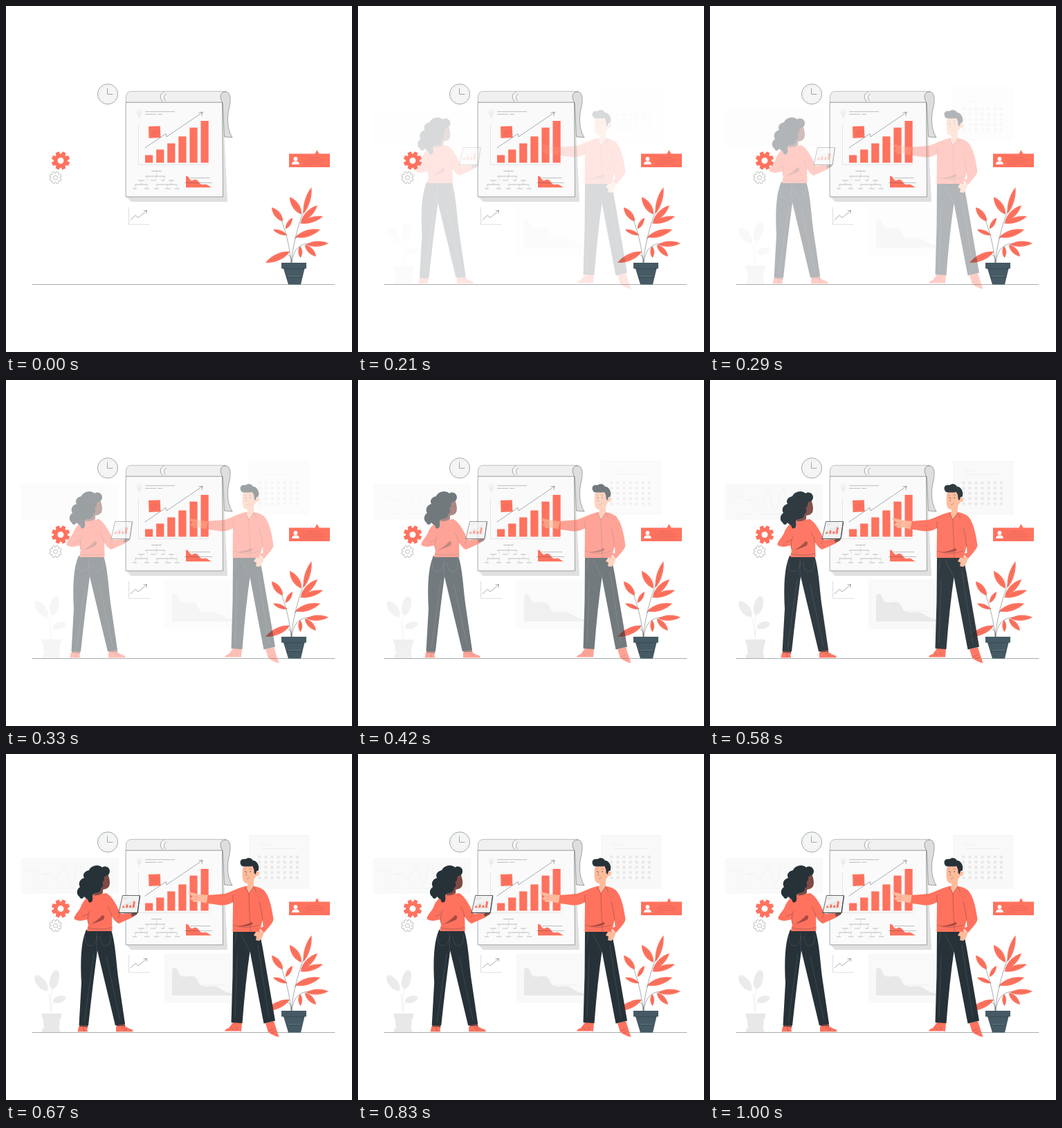
These frames come from a looping animation (500 px wide and 500 px high, 1.04 s). An HTML page:

```html
<!DOCTYPE html>
<html lang="en">
<head>
<meta charset="utf-8">
<title>Business presentation</title>
<style>
html, body { margin: 0; width: 100%; height: 100%; overflow: hidden; background: #fff; }
svg { display: block; width: 100vw; height: 100vh; }
.coral { fill: #ff725e; }
.dark { fill: #263238; }
.skin { fill: #ffbb9c; }
.brown { fill: #7f4a43; }
.fold { fill: #a94a40; }
.pale { fill: #e8e8e8; }
.line { fill: none; stroke: #263238; stroke-width: .5; stroke-opacity: .8; stroke-linecap: round; stroke-linejoin: round; }
.thin { fill: none; stroke: #263238; stroke-width: .4; stroke-opacity: .75; }
.hair { fill: none; stroke: #263238; stroke-width: .25; stroke-opacity: .5; }
.seam { fill: none; stroke: #6f7b80; stroke-width: .3; }
.faint { fill: none; stroke: #e8e8e8; stroke-width: .6; }
</style>
</head>
<body>
<svg viewBox="0 0 500 500">
  <g id="backdrop">
    <path fill="#f9f9f9" d="M22 150H163V202H22ZM229 288H327V360H229Z"/>
    <path class="faint" stroke-opacity=".7" d="M31 168h16l3 6h12M57 179q5-15 11-3t11-7 10 8 11-5 10 5 13 1M45 194h16M71 194h30M108 194h12"/>
    <path fill="#f9f9f9" stroke="#f0f0f0" stroke-width=".6" d="M351.5 117.500H438V194H351.500Z"/>
    <path class="faint" d="M366 131h17M369 136.500h49"/>
    <g id="days" class="pale"></g>
    <path class="pale" d="M240 349V312C243 306 248 310 250 317C253 324 260 321 266 321C275 320 276 326 280 333C286 339 298 333 306 337C314 341 318 345 327 346V349Z"/>
    <path class="faint" d="M283 334h31"/>
    <g fill="#ebebeb">
      <ellipse cx="70" cy="326" rx="6.500" ry="14" transform="rotate(14 70 326)"/>
      <ellipse cx="51" cy="331" rx="6.500" ry="13.500" transform="rotate(-38 51 331)"/>
      <ellipse cx="77" cy="354.500" rx="9.500" ry="5" transform="rotate(-18 77 354.500)"/>
    </g>
    <path class="faint" d="M65 375Q66 355 58 339M65 371Q62 356 69 328M65 371Q64 360 74 355"/>
    <path class="pale" d="M51.500 375H80V380.500H78.500L76.500 397H78V402H52V397H55L53 380.500H51.500Z"/>
    <path class="faint" stroke="#d8d8d8" d="M53 381H79M54 397H77"/>
  </g>

  <path class="line" stroke-opacity=".65" d="M38 402.500H475"/>

  <g id="clock">
    <circle cx="147" cy="127.300" r="14.600" fill="#f5f5f5" stroke="#455a64" stroke-width=".5"/>
    <path class="line" d="M146.500 119V127.500H154"/>
    <path id="ticks" class="hair"/>
  </g>

  <g id="board">
    <path fill="#e0e0e0" d="M174 276L181 283H320L313 139Z"/>
    <path class="line" style="fill:#f0f0f0;stroke-width:.35" d="M173.500 139V131Q174 123.300 182 123.300H318L313 139Z"/>
    <path class="line" style="fill:#fafafa" d="M228 124Q219 129 226 138M231.500 127Q226 132 230.500 137"/>
    <path class="line" style="fill:#dedede" d="M313 140C307 130 311 124 317 124C325 124 325 135 323 145C319 160 319 177 327 190L316 189Z"/>
    <path class="line" style="fill:#fafafa" d="M173.500 139.300H312.500L313.500 275.800H173.500Z"/>
    <path class="hair" d="M190 153q-1 4 1.500 5.500h2q2.500-2 1.500-5.500M190.500 161h3.500M192.500 150v8M187 150l2 2M197 150l-2 2"/>
    <path class="thin" d="M201 152.700h43M201 156.500h16M219 156.500h7"/>
    <path class="line" style="stroke:#c4c4c4" d="M191.500 172V229.500H293"/>
    <g id="bars" class="coral"></g>
    <path class="coral" d="M206 174L222.700 173.500L223.500 190.300L206.500 191Z"/>
    <path class="hair" d="M209 180h11M209 183h12M210 186h7"/>
    <path class="line" d="M201 205L231 184.500L232 189L284 153.700M279 154L284 153.500L283 158.500"/>
    <path class="thin" d="M210 238.500h15M201 246h29M191 252h9M209 252h7M224 252h5M235 252h8M186 258h19M217 258h30M183 264h6M200 264h7M214 264h7M230 264h8M244 264h7"/>
    <path class="hair" d="M217.500 238.500v7.500M204 246v6M217 246v6M229 246v6M195 252v6M239 252v6M187 258v5M204 258v5M218 258v5M233 258v5M247 258v5"/>
    <path class="coral" d="M260 246C264 244 265 252 269 252.500C273 250 276 250 279 255C283 260 286 257 290 258L297 262.300H260Z"/>
    <path class="thin" d="M266 248.500h29M258 255.500h40"/>
    <path class="line" style="stroke:#aaa" d="M177.500 291V315.700H207"/>
    <path class="line" d="M180 309L187 302.500L191 306L203 296M199 296L203.500 295.500L203 300"/>
  </g>

  <path id="bigGear" class="coral" fill-rule="evenodd"/>
  <path id="smallGear" class="thin" style="fill:#fff" fill-rule="evenodd"/>

  <g id="card">
    <path class="coral" d="M409 213.500H446.500L449.500 208L452.500 213.500H468V233H409Z"/>
    <circle cx="418.500" cy="221" r="2.900" fill="#fff"/>
    <path fill="#fff" d="M413 229Q413.500 224.500 417 224.500H420Q423.500 224.500 424 229Z"/>
    <path class="hair" d="M435 219.500h18M430 223h29M433 226h25M429 229h15"/>
  </g>

  <g id="plant">
    <path class="line" d="M412 371C414 350 421 320 429 299L437 276M412 371C410 350 406 330 397 307M413 371C415 352 424 343 440 343M413 371Q414 359 403 358M417 336L425 332M406 331L399 327"/>
    <g id="coralLeaves"></g>
    <path fill="#455a64" d="M398 371H434V379.500H431.500L426 402.500H408L401 379.500H398Z"/>
    <path class="line" d="M401 379.700H431.500M406 393l3-2 3 2 3-2 3 2 3-2 3 2 3-2"/>
    <path class="thin" style="stroke:#a5b0b5" d="M407 390.500h19"/>
  </g>

  <g id="man">
    <path class="coral" d="M328 388L341 388L340 400.500H316Q317 397 322 396ZM375 389L387 386L394.500 409Q388 408 379 402Z"/>
    <path class="thin" d="M325 395l4 3M332 394l3 4M380 400l7-3M383 403l6-2"/>
    <path class="dark" d="M328 256H366L370.500 278L389 385.500L372.500 389.500L352.500 285Q346 330 341.500 389L325.500 388L327.500 320Z"/>
    <path class="seam" d="M340 260L352 285M333 258l-2 16M364 276l16 105M334 290l-3 90"/>
    <path class="skin" d="M363 254L373 257Q371 266 366 270L361 269L362 264L358 262Z"/>
    <path class="skin" d="M292 204L280 203L266 199.500Q261 199.500 265 202.500L270 206L266 209Q267 211 269 211L271 214L279 213L291 216Z"/>
    <path class="hair" d="M271 206l6 1M269 211l7-1"/>
    <path class="coral" d="M346 191C334 194 326 199 316 202L292 204L289.500 215.500L310 218.500Q320 219 328 214L327.500 257H366L371 240L371.500 250L365 251L373 258C379 251 386 244 386.500 239C384 222 381 206 373 197Q366 192 358 191Z"/>
    <path class="thin" d="M346 193l5 9 7-10 4 8M351 202l2 55M366 213q4 16 5 28M328 204v11M328 247q20 7 38 0"/>
    <path class="fold" d="M333 249Q345 248 355 243Q359 246 352 248Q343 250 333 249Z"/>
    <path class="skin" d="M343 161C341 169 341 178 343 184Q346 188 349 187L348 194L351 201L358 191V182L363 174V160Z"/>
    <circle class="skin" cx="362.500" cy="173" r="3.300"/>
    <path class="dark" d="M341 162C336 157 339 150 346 152C350 149 355 150 357 154C363 154 367 162 364.500 169Q361 168 361 174L358.500 172Q359 166 356 162Q349 163 341 162Z"/>
    <path class="thin" d="M344 166.500l3-.5M351 166l4 .5M348 170l-1.500 5h2M348 180.500q3-.5 4-2.500"/>
    <circle class="dark" cx="346" cy="170" r=".7"/>
    <circle class="dark" cx="353" cy="170" r=".7"/>
  </g>

  <g id="woman">
    <path class="brown" d="M106 389H118V396H106ZM159 388L171 387L173 396H161Z"/>
    <path class="coral" d="M105 394L117 394.500L118 401.300H103.500ZM159 393.500L172 393Q175 396 182 398Q184 400 183.500 401.300H159Z"/>
    <path class="thin" d="M112 395l1 6M167 396l5-1M170 399l5-2"/>
    <path class="dark" d="M116 254H152C158 273 159 298 162 322L172 390L158 392.500L132 284Q125 336 119 392.500L105.500 392L109 330C107.500 300 108 272 116 254Z"/>
    <path class="seam" d="M131 258L131 284M114 262q0 16 8 15t10-14M136 263q1 16 9 14t6-16M127 288l-14 100M145 293l20 92"/>
    <path class="brown" d="M175 232L187 229Q191 230 189 232L180 237Z"/>
    <path class="coral" d="M126 204C116 206 111 213 108 221C105 228 98 233 98.500 238.500Q104 243 117 239L119 246L117 256H153.500L153 235Q158 243 163 245L183 236L179 230L166 231C161 221 155 207 145 201Z"/>
    <path class="thin" d="M119 246q-2-12 2-20M153 235q-2-9-6-15M110 235l9-4M117.500 251q18 4 36 0M161 237l4-5"/>
    <path class="fold" d="M122 246Q131 242 139 233Q144 233 141 239Q134 243 122 246Z"/>
    <path class="brown" d="M133 178L146 172Q149.500 177 150 186Q149.500 194 144 195L140 196V201Q134 205 126 204Z"/>
    <path class="dark" d="M149.500 172C152 165 144 160 139 164C133 158 122 162 120 168C114 169 110 174 113 179C106 181 104 188 107 192C101 196 102 204 106 206C107 210 111 210 113 206C116 210 119 209 119 213C121 216 125 214 125 211C126 206 123 205 128 201C134 201 138 198 137 194C142 191 140 187 139 185C144 183 140 178 144 176Q148 176 149.500 172Z"/>
    <path class="thin" d="M145 182l3-.5M146 191l3-.5"/>
    <path class="line" style="fill:#f2f2f2;stroke-width:.9" d="M163 229L168.500 204.500H193.500L190 229Z"/>
    <path class="line" style="stroke-width:1.200" d="M163 229.500H190L193.500 205"/>
    <path class="coral" d="M168 222l.5-2.500h3l-.5 2.500ZM173 222l.7-4.500h3l-.7 4.500ZM178 222l.5-3.500h3l-.5 3.500ZM182.500 222l1.500-9h3l-1.500 9Z"/>
    <path class="hair" d="M167 222.500h20M169 219l7-4 3 1 7-6M170 208h7M170 210h4"/>
  </g>
</svg>
<script>
const byId = id => document.getElementById(id);
const FRAME = 1000 / 24, LAST = 24, LOOP = 1040;

// Pointed leaf from base to tip with a midrib.
function leaf([x, y, tipX, tipY, width]) {
  const length = Math.hypot(tipX - x, tipY - y);
  const nx = (tipY - y) * width / length, ny = (x - tipX) * width / length;
  const at = (along, side) =>
    `${x + (tipX - x) * along + nx * side} ${y + (tipY - y) * along + ny * side}`;
  return `<path class="coral" d="M${x} ${y}C${at(.25, .65)} ${at(.7, .65)} ${tipX} ${tipY}C${at(.7, -.65)} ${at(.25, -.65)} ${x} ${y}Z"/>
    <path class="hair" d="M${x} ${y}L${at(.85, 0)}"/>`;
}

function gear(cx, cy, outer, inner, hole) {
  const points = [];
  for (let i = 0; i < 8; i++) {
    for (const [turn, r] of [[-.3, inner], [-.2, outer], [.2, outer], [.3, inner]]) {
      const a = (i + .5) * Math.PI / 4 + turn;
      points.push(`${cx + r * Math.cos(a)} ${cy + r * Math.sin(a)}`);
    }
  }
  return `M${points.join('L')}ZM${cx - hole} ${cy}a${hole} ${hole} 0 1 0 ${2 * hole} 0a${hole} ${hole} 0 1 0 ${-2 * hole} 0Z`;
}

byId('bigGear').setAttribute('d', gear(79, 223.5, 13.4, 10, 4.5));
byId('smallGear').setAttribute('d', gear(71.5, 248, 8.8, 6.5, 3));

byId('bars').innerHTML = [215.5, 207.5, 198.5, 188.5, 175.7, 166].map((top, i) =>
  `<rect x="${201 + i * 16.1}" y="${top}" width="11.2" height="${226.5 - top}"/>`).join('');

byId('days').innerHTML = Array.from({ length: 35 }, (_, i) =>
  `<circle cx="${366.3 + i % 7 * 9.1}" cy="${148.7 + Math.floor(i / 7) * 7.5}" r="2.2"/>`).join('');

byId('ticks').setAttribute('d', Array.from({ length: 12 }, (_, i) => {
  const c = Math.cos(i * Math.PI / 6), s = Math.sin(i * Math.PI / 6);
  return `M${147 + 11 * c} ${127.3 + 11 * s}L${147 + 12.3 * c} ${127.3 + 12.3 * s}`;
}).join(''));

byId('coralLeaves').innerHTML = [
  [430, 300, 441.5, 262, 8], [427, 301, 410, 276, 10], [426, 312, 450, 288, 9],
  [425, 314, 458, 304, 8], [418, 334, 454, 323, 10], [400, 311, 384, 291, 9],
  [404, 322, 414, 306, 6], [406, 331, 386, 323, 6], [434, 344.5, 466, 343, 8],
  [432, 345, 448, 362, 8], [425, 347, 425.5, 364, 6], [410, 355, 375, 371, 10]
].map(leaf).join('');

const fading = ['backdrop', 'man', 'woman'].map(byId);
const woman = byId('woman');

function render(time) {
  const step = Math.min(LAST, Math.floor((time % LOOP + 4) / FRAME));
  const u = Math.min(1, Math.max(0, (step - 1) / 15));
  const shown = u * u * (3 - 2 * u);
  const sway = step > 16 ? Math.sin(Math.PI * (step - 16) / 8) * 1.2 : 0;
  for (const part of fading) part.setAttribute('opacity', shown);
  woman.setAttribute('transform', `translate(${-20 * (1 - shown) + sway} 0)`);
}

const start = performance.now();
function tick() {
  render(performance.now() - start);
  requestAnimationFrame(tick);
}
tick();
</script>
</body>
</html>
```
